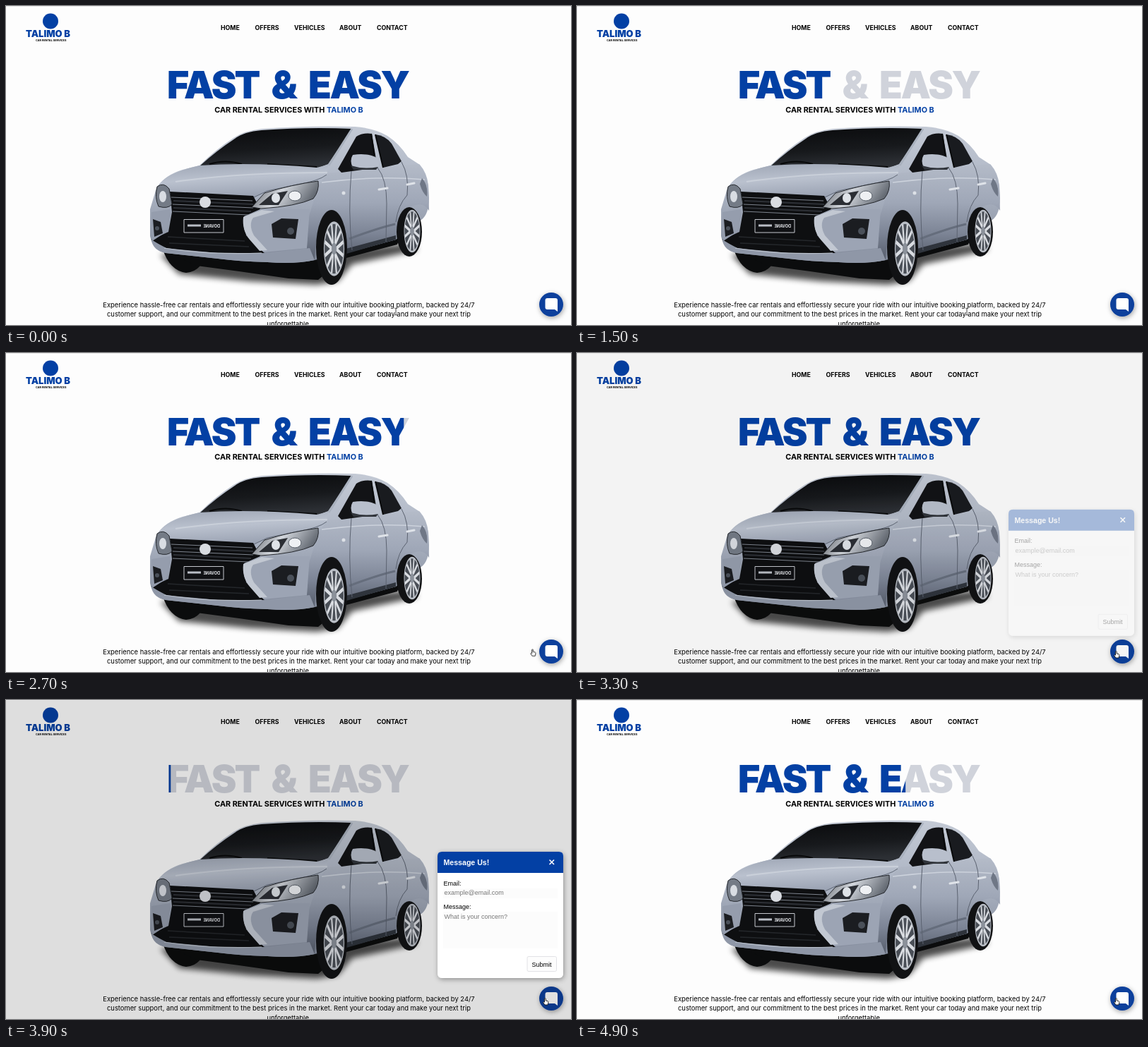
These frames come from a looping animation (800x452 px, 5 s). An HTML page:

```html
<!DOCTYPE html>
<html lang="en">
<head>
<meta charset="utf-8">
<title>Car rental</title>
<style>
  html, body { margin: 0; width: 100%; height: 100%; overflow: hidden; background: #fdfdfd; }
  svg { display: block; width: 800px; height: 452px; }
  text { white-space: pre; }
  .sans { font-family: Inter, "Open Sans", sans-serif; }
  .form { font-family: "Liberation Sans", Arial, sans-serif; font-size: 9px; }
  .title { font: 900 53.6px Inter, Roboto, sans-serif; letter-spacing: -2.4px; }
  .nav { font-size: 8.8px; font-weight: 700; }
  .sub { font-size: 10.85px; font-weight: 700; text-anchor: middle; }
  .copy { font-size: 9.38px; text-anchor: middle; }
  .blue { fill: #0340a4; }
  .hint { fill: #777; }

  .sweep, .dim, .popup, .cursor, .cursor > * { animation: 5s linear infinite; }
  .sweep { transform-origin: 229px 0; animation-name: sweep; }
  .dim { animation-name: dim; }
  .popup { animation-name: popup; }
  .cursor { animation-name: travel; }
  .cursor > * { animation-timing-function: step-end; }
  .beam { animation-name: beam; }
  .arrow { animation-name: arrow; }
  .hand { animation-name: hand; }

  @keyframes sweep {
    0%, 60% { transform: scaleX(1); }
    6%, 66% { transform: scaleX(1); animation-timing-function: ease; }
    12%, 17%, 72%, 77% { transform: scaleX(0); }
    18%, 78% { transform: scaleX(.012); }
    22.8%, 82.8% { transform: scaleX(.1); }
    27.6%, 87.6% { transform: scaleX(.297); }
    32.4%, 92.4% { transform: scaleX(.5); }
    34%, 94% { transform: scaleX(.564); }
    38%, 98% { transform: scaleX(.682); }
    42% { transform: scaleX(.8); }
    46.8% { transform: scaleX(.887); }
    54% { transform: scaleX(.966); }
    100% { transform: scaleX(.742); }
  }
  @keyframes dim {
    0%, 64%, 98%, 100% { opacity: 0; }
    66% { opacity: .32; }
    68% { opacity: .68; }
    72%, 92% { opacity: 1; }
    94% { opacity: .74; }
    96% { opacity: .35; }
  }
  @keyframes popup {
    0%, 64%, 98%, 100% { opacity: 0; transform: translateY(10px); }
    66% { opacity: .32; transform: translateY(6.8px); }
    68% { opacity: .68; transform: translateY(3.2px); }
    72%, 92% { opacity: 1; transform: none; }
    94% { opacity: .76; transform: translateY(2.4px); }
    96% { opacity: .35; transform: translateY(6.5px); }
  }
  @keyframes travel {
    0%, 34% { transform: translate(552px, 433px); }
    42% { transform: translate(638px, 408px); }
    56%, 100% { transform: translate(764px, 427px); }
  }
  @keyframes beam { 0% { opacity: 1; } 38%, 100% { opacity: 0; } }
  @keyframes arrow { 0% { opacity: 0; } 38% { opacity: 1; } 54%, 100% { opacity: 0; } }
  @keyframes hand { 0% { opacity: 0; } 54%, 100% { opacity: 1; } }
</style>
</head>
<body>
<svg viewBox="0 0 800 452">
  <defs>
    <linearGradient id="body" x2="0" y2="1">
      <stop offset="0" stop-color="#c4cad5"/>
      <stop offset=".45" stop-color="#adb5c4"/>
      <stop offset="1" stop-color="#7f8797"/>
    </linearGradient>
    <linearGradient id="hood" x2=".3" y2="1">
      <stop offset="0" stop-color="#9da5b4"/>
      <stop offset=".5" stop-color="#bac1ce"/>
      <stop offset="1" stop-color="#9ba3b3"/>
    </linearGradient>
    <linearGradient id="side" x2="0" y2="1">
      <stop offset="0" stop-color="#b4bbc8"/>
      <stop offset=".4" stop-color="#9fa7b7"/>
      <stop offset=".72" stop-color="#7c8495"/>
      <stop offset="1" stop-color="#555c6a"/>
    </linearGradient>
    <linearGradient id="glass" x2=".25" y2="1">
      <stop offset="0" stop-color="#090a0c"/>
      <stop offset=".6" stop-color="#17191c"/>
      <stop offset="1" stop-color="#2c2f34"/>
    </linearGradient>
    <linearGradient id="lamp" x2="1" y2=".3">
      <stop offset="0" stop-color="#454950"/>
      <stop offset=".5" stop-color="#d4d8de"/>
      <stop offset="1" stop-color="#646a73"/>
    </linearGradient>
    <filter id="soft" x="-20%" y="-60%" width="140%" height="220%"><feGaussianBlur stdDeviation="4"/></filter>
    <filter id="lift" x="-30%" y="-30%" width="160%" height="170%">
      <feDropShadow dx="1" dy="2" stdDeviation="3.5" flood-opacity=".36"/>
    </filter>
    <clipPath id="reveal"><rect class="sweep" x="229" y="80" width="346" height="62"/></clipPath>
    <text id="headline" class="title" y="131"><tspan x="228">FAST</tspan> <tspan x="375.5">&amp;</tspan> <tspan x="428">EASY</tspan></text>

    <!-- unit wheel rim, squeezed into an ellipse where it is used -->
    <path id="spoke" d="M-1 -2 L-2.4 -9.3 M1 -2 L2.4 -9.3" stroke="#dadde2" stroke-width="1.5"/>
    <g id="rim">
      <circle r="10" fill="#4a4f57" stroke="#b9bec6" stroke-width=".9"/>
      <use href="#spoke"/>
      <use href="#spoke" transform="rotate(60)"/>
      <use href="#spoke" transform="rotate(120)"/>
      <use href="#spoke" transform="rotate(180)"/>
      <use href="#spoke" transform="rotate(240)"/>
      <use href="#spoke" transform="rotate(300)"/>
      <circle r="2.4" fill="#8b919a"/>
    </g>
  </defs>

  <rect width="800" height="452" fill="#fdfdfd"/>
  <rect width="800" height="1" fill="#e6e6e6"/>

  <g class="sans">
    <circle class="blue" cx="63" cy="21.5" r="11"/>
    <text class="blue" x="28" y="44" font-size="13" font-weight="900">TALIMO B</text>
    <text x="42" y="49.5" font-size="3.8" font-weight="700">CAR RENTAL SERVICES</text>

    <g class="nav">
      <text x="304" y="34">HOME</text>
      <text x="352.5" y="34">OFFERS</text>
      <text x="408" y="34">VEHICLES</text>
      <text x="472" y="34">ABOUT</text>
      <text x="525" y="34">CONTACT</text>
    </g>

    <text class="sub" x="400.5" y="151">CAR RENTAL SERVICES WITH <tspan class="blue">TALIMO B</tspan></text>

    <g class="copy">
      <text x="400.5" y="427">Experience hassle-free car rentals and effortlessly secure your ride with our intuitive booking platform, backed by 24/7</text>
      <text x="400.5" y="440.3">customer support, and our commitment to the best prices in the market. Rent your car today and make your next trip</text>
      <text x="400.5" y="453.6">unforgettable.</text>
    </g>
  </g>

  <use href="#headline" fill="#d0d3db"/>
  <g clip-path="url(#reveal)"><use href="#headline" class="blue"/></g>

  <g id="car" stroke-linejoin="round">
    <path d="M218 352 L440 350 L578 335 L582 346 L490 366 L470 390 L440 395 L345 390 L245 380 Z" fill="#000" opacity=".7" filter="url(#soft)"/>
    <path d="M222 345 H282 Q280 376 255 378 Q232 375 222 345Z" fill="#0b0c0d"/>
    <path d="M226 348 L445 345 L560 322 L554 338 L478 358 L442 388 L400 386 L330 376 L270 368 Z" fill="#0b0c0d"/>

    <!-- body and side -->
    <path d="M274 226 Q296 204 322 187 Q336 177 362 174 Q430 169 494 171 Q522 173 540 184 Q557 195 569 214 L586 225 Q596 236 598 254 L599 272 Q599 295 588 303 L552 331 L482 350 L437 360 Q410 366 370 363 Q330 362 300 358 L226 350 Q208 346 204 326 L204 288 L213 258 Q224 240 250 232Z" fill="url(#body)"/>
    <path d="M455 237 L530 229 L585 224 Q597 240 598 258 L599 290 Q590 275 571 286 Q553 300 552 331 L482 350 Q480 289 459 291 Q441 294 437 360 L425 361 L428 300 L443 254Z" fill="url(#side)"/>
    <path d="M481 344 L552 325 V331 L482 351Z" fill="#2f343c"/>
    <path d="M447 250 Q525 240 593 246" fill="none" stroke="#ccd2dc" stroke-width="1.5"/>
    <path d="M486 330 Q525 315 551 309" fill="none" stroke="#656d7c" stroke-width="3"/>

    <!-- glass -->
    <path d="M274 227 Q298 205 324 188 Q337 178 362 176 Q430 171 490 174 L456 224 L440 230 Q350 222 274 227Z" fill="url(#glass)"/>
    <path d="M288 224 Q310 217 334 224 M370 224 L440 228" fill="none" stroke="#08090a" stroke-width="2"/>
    <path d="M470 231 L496 185 Q506 179 518 181 L526 229 L475 236Z" fill="#121316"/>
    <path d="M523 182 Q538 184 546 195 L560 220 L555 224 L534 229Z" fill="#191b1f"/>
    <path d="M524 230 L517 181 M534 229 L523 182" stroke="#08090a" stroke-width="2"/>
    <path d="M490 174 L457 226" stroke="#a9b1be" stroke-width="3"/>
    <path d="M491 211 Q512 208 525 215 Q531 224 526 229 Q510 232 491 229 Q486 219 491 211Z" fill="#b8bfcc"/>
    <path d="M488 226 Q507 232 527 228 L524 232 L492 232Z" fill="#30343a"/>
    <path d="M526 229 Q539 245 539 280 L538 334 M489 234 Q484 290 490 346 M560 221 Q571 240 568 268 Q555 282 552 306" fill="none" stroke="#5b6270" stroke-width="1"/>
    <path d="M528 260 L540 258 M568 253 L578 251" stroke="#dfe3e9" stroke-width="3" stroke-linecap="round"/>
    <path d="M589 244 Q598 254 596 270 Q589 264 586 252Z" fill="#6f7786"/>
    <circle cx="478" cy="265" r="2.5" fill="#dde1e7"/>

    <!-- hood -->
    <path d="M274 226 Q350 221 440 229 L456 225 L454 239 Q443 248 412 253 L370 262 L349 272 L232 266 L214 257 Q228 236 274 226Z" fill="url(#hood)"/>
    <path d="M240 249 Q330 236 455 236" fill="none" stroke="#d2d7e0" stroke-width="2" opacity=".7"/>
    <path d="M349 272 L370 262 L412 253 Q443 248 454 239" fill="none" stroke="#5f6775" stroke-width="1"/>

    <!-- grille and bumper -->
    <path d="M232 263 L350 269 L360 288 L337 298 L340 325 L366 350 L300 350 L225 343 L206 331 L230 320 L235 292Z" fill="#0e0f11"/>
    <path d="M234 271 L349 276 M236 281 L350 286 M236 291 L344 296" stroke="#7d838d" stroke-width="1"/>
    <path d="M237 276 L350 281 M237 286 L347 291" stroke="#2d3036" stroke-width="2"/>
    <path d="M229 327 L338 333 M231 336 L344 341" stroke="#24272b" stroke-width="1.5"/>
    <path d="M361 288 L337 299 Q334 318 345 330 L365 349 L426 343 L430 288Z" fill="#9ca4b4"/>
    <path d="M362 289 L336 299 Q334 318 345 331 L359 347 L370 346 L351 325 Q343 310 350 300 L380 291Z" fill="#c2c8d2"/>
    <path d="M206 292 L232 288 L233 296 L227 320 L207 333Z" fill="#959dad"/>
    <path d="M208 302 L219 306 L222 322 L210 327Z M376 309 L390 301 L414 302 L410 330 L378 328Z" fill="#1b1d21"/>
    <circle cx="403" cy="319" r="5" fill="#4a5059"/>
    <circle cx="214" cy="315" r="3" fill="#4a5059"/>
    <path d="M206 332 L229 344 L300 351 L366 350 L430 343 L437 360 Q410 366 370 363 Q330 362 300 358 L226 350 Q208 346 206 332Z" fill="#8f97a7"/>
    <path d="M224 343 Q290 353 362 350" fill="none" stroke="#b9c0cb" stroke-width="1.2"/>

    <!-- lamps -->
    <path d="M348 285 L366 265 Q405 253 442 248 Q444 262 435 273 Q411 284 361 287Z" fill="url(#lamp)" stroke="#25282d"/>
    <path d="M358 282 L377 266 L399 262 L386 282Z" fill="#2b2e34"/>
    <ellipse cx="382" cy="272" rx="6" ry="7" fill="#dfe3e8"/>
    <ellipse cx="409" cy="269" rx="9" ry="7" fill="#eef0f3" stroke="#5a616b"/>
    <path d="M214 256 Q223 249 231 259 L235 281 Q229 288 216 284 Q210 271 214 256Z" fill="#747b86" stroke="#25282d"/>
    <ellipse cx="222" cy="270" rx="5" ry="8" fill="#d9dde3"/>

    <circle cx="282" cy="278" r="8" fill="#d9dce1"/>
    <rect x="252" y="302.5" width="56" height="18.5" fill="#101114" stroke="#c5c8ce"/>
    <path d="M257 311 H276" stroke="#b9bdc5" stroke-width="3"/>
    <text class="sans" transform="translate(303 314) scale(-1 1)" font-size="5.6" font-weight="700" fill="#e6e8ec">DOVANE</text>

    <!-- wheels -->
    <ellipse cx="461" cy="342" rx="22" ry="53" fill="#111214"/>
    <use href="#rim" transform="translate(464.5 344) scale(1.4 3.7)"/>
    <ellipse cx="571" cy="320" rx="18" ry="35" fill="#111214"/>
    <use href="#rim" transform="translate(575 319) scale(1.1 2.9)"/>
  </g>

  <g id="chat">
    <circle cx="772" cy="423" r="17" fill="#0b3f9c" filter="url(#lift)"/>
    <path d="M766.5 414 H778 Q781 414 781 417 V433 L777 430 H766.5 Q763.5 430 763.5 427 V417 Q763.5 414 766.5 414Z" fill="#fff"/>
  </g>

  <rect class="dim" y="1" width="800" height="451" fill="rgba(0,0,0,.123)"/>

  <g class="popup form">
    <rect x="611" y="215" width="178" height="179" rx="6" fill="#fff" filter="url(#lift)"/>
    <path class="blue" d="M611 245 V221 Q611 215 617 215 H783 Q789 215 789 221 V245Z"/>
    <text x="619.5" y="234" font-size="10.6" font-weight="700" fill="#fff">Message Us!</text>
    <path d="M769.5 226.5 l6.5 6.5 m0 -6.5 l-6.5 6.5" stroke="#fff" stroke-width="1.6"/>
    <path d="M619 267 H781 V281 H619Z M619 300 H781 V352 H619Z" fill="#fcfcfc"/>
    <text x="619.5" y="262.5">Email:</text>
    <text class="hint" x="620.5" y="276">example@email.com</text>
    <text x="619.5" y="296">Message:</text>
    <text class="hint" x="620.5" y="310">What is your concern?</text>
    <rect x="738" y="363.5" width="41.5" height="21" rx="2" fill="#fdfdfd" stroke="#e2e2e6"/>
    <text x="744.5" y="377.5">Submit</text>
  </g>

  <g class="cursor">
    <path class="beam" d="M-2 -5 Q0 -5 0 -4 Q0 -5 2 -5 M0 -4 V4 M-2 5 Q0 5 0 4 Q0 5 2 5" fill="none" stroke="#333" stroke-width=".9"/>
    <path class="arrow" d="M0 0 V8.5 L2 6.7 L3.4 9.8 L4.8 9.2 L3.5 6.2 H6Z" fill="#111" stroke="#fff" stroke-width=".5"/>
    <path class="hand" d="M-1.5 -4 Q-.5 -5 .2 -4 V-1 L3 -.5 Q4 0 3.8 2 L3 5 H-1 L-3.5 1.5 Q-3 .3 -1.5 1.2Z" fill="#fff" stroke="#111" stroke-width=".9"/>
  </g>
</svg>
</body>
</html>
```
